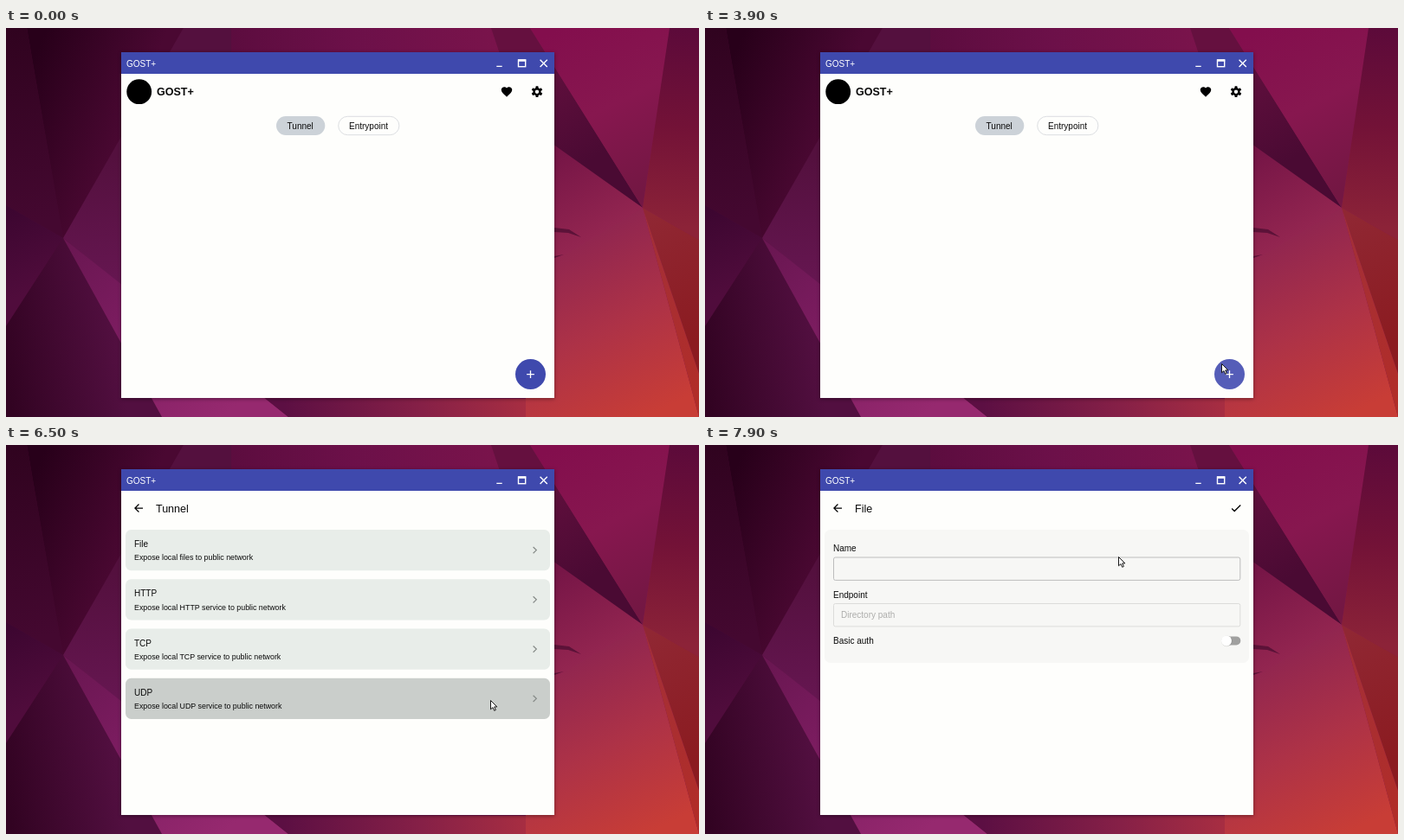
An HTML page with a canvas that plays this animation: 800x450 px, repeating every 8000 ms.

```html
<!DOCTYPE html>
<html lang="en">
<head>
<meta charset="utf-8">
<title>GOST+</title>
<style>
html, body { margin: 0; width: 100%; height: 100%; overflow: hidden; background: #4a0833; }
canvas, svg { position: absolute; left: 0; top: 0; width: 800px; height: 450px; }
text { font: 10px "Liberation Sans", Arial, sans-serif; fill: #0b0b0b; }
.head { font-size: 12.5px; }
.sub { font-size: 8.85px; }
.window { filter: drop-shadow(0 1px 2px rgba(0, 0, 0, .4)); }

.home, .list, .form, .cursor, .fab, .card { animation: 8s step-end infinite; }
.home { animation-name: home; }
.list { animation-name: list; }
.form { animation-name: form; }
.fab { fill: #3f49ad; animation-name: fab; }
.card { fill: #e8ede9; }
.file { animation-name: file; }
.http { animation-name: http; }
.tcp { animation-name: tcp; }
.udp { animation-name: udp; }
.cursor { animation-name: appear, move; }

@keyframes home { 0% { visibility: visible } 72.5%, 100% { visibility: hidden } }
@keyframes list { 0% { visibility: hidden } 72.5% { visibility: visible } 97.5%, 100% { visibility: hidden } }
@keyframes form { 0% { visibility: hidden } 97.5%, 100% { visibility: visible } }
@keyframes appear { 0% { visibility: hidden } 36.25%, 100% { visibility: visible } }
@keyframes fab { 0% { fill: #3f49ad } 46.25%, 100% { fill: #555db8 } }
@keyframes udp { 0% { fill: #e8ede9 } 81.25% { fill: #cacecb } 82.5%, 100% { fill: #e8ede9 } }
@keyframes tcp { 0% { fill: #e8ede9 } 82.5% { fill: #cacecb } 85%, 100% { fill: #e8ede9 } }
@keyframes http { 0% { fill: #e8ede9 } 85% { fill: #cacecb } 86.25%, 100% { fill: #e8ede9 } }
@keyframes file { 0% { fill: #e8ede9 } 87.5%, 100% { fill: #cacecb } }

/* the pointer advances in 100 ms steps */
@keyframes move {
  0%, 36.25% { transform: translate(451px, 405px); animation-timing-function: steps(8) }
  46.25% { transform: translate(596px, 388px) }
  58.75% { transform: translate(596px, 388px); animation-timing-function: steps(4) }
  63.75% { transform: translate(611px, 391px) }
  66.25% { transform: translate(614px, 392px) }
  76.25% { transform: translate(614px, 392px); animation-timing-function: steps(4) }
  81.25% { transform: translate(559px, 295px); animation-timing-function: steps(4) }
  86.25% { transform: translate(488px, 151px) }
  87.5% { transform: translate(479px, 138px); animation-timing-function: steps(3) }
  91.25%, 100% { transform: translate(477px, 129px) }
}
</style>
</head>
<body>
<canvas id="wall" width="800" height="450"></canvas>
<svg viewBox="0 0 800 450">
  <defs>
    <path id="back" d="M20 11H7.83l5.59-5.59L12 4l-8 8 8 8 1.41-1.41L7.83 13H20z"/>
    <rect id="tooth" x="-1.5" y="-6.4" width="3" height="4" rx=".5"/>
  </defs>

  <rect class="window" x="133" y="28" width="500" height="400" fill="#fefefc"/>
  <rect x="133" y="28" width="500" height="25" fill="#3f49ad"/>
  <text x="139" y="44.5" style="fill:#fff">GOST+</text>
  <g fill="none" stroke="#fff" stroke-width="1.4">
    <path d="M566.3 44.4h6.4M616.6 36.8l8.2 8.2m0-8.2l-8.2 8.2"/>
    <rect x="591.5" y="37" width="8.2" height="7.7"/>
    <path d="M591 37.5h9.2" stroke-width="2.5"/>
  </g>

  <g class="home">
    <circle cx="153.7" cy="73.7" r="14.4"/>
    <text class="head" x="174" y="78" font-weight="700" style="font-weight:700">GOST+</text>
    <path transform="translate(570.5 66.3) scale(.625)" d="M12 21.35l-1.45-1.32C5.4 15.36 2 12.28 2 8.5 2 5.42 4.42 3 7.5 3c1.74 0 3.41.81 4.5 2.09C13.09 3.81 14.76 3 16.5 3 19.58 3 22 5.42 22 8.5c0 3.78-3.4 6.86-8.55 11.54z"/>
    <g transform="translate(613 73.7)">
      <circle r="3.4" fill="none" stroke="#000" stroke-width="2.4"/>
      <use href="#tooth"/>
      <use href="#tooth" transform="rotate(60)"/>
      <use href="#tooth" transform="rotate(120)"/>
      <use href="#tooth" transform="rotate(180)"/>
      <use href="#tooth" transform="rotate(240)"/>
      <use href="#tooth" transform="rotate(300)"/>
    </g>
    <rect x="312" y="102" width="56.3" height="22" rx="11" fill="#ccd2d8"/>
    <rect x="383.7" y="102.3" width="70.2" height="21.4" rx="10.7" fill="none" stroke="#d8dbde" stroke-width=".9"/>
    <text x="324.6" y="116.8">Tunnel</text>
    <text x="396" y="116.8">Entrypoint</text>
    <circle class="fab" cx="605.5" cy="400.5" r="17.5"/>
    <path d="M601.1 400.6h8.8m-4.4-4.4v8.8" stroke="#fff" stroke-width="1.3"/>
  </g>

  <g class="list">
    <use href="#back" transform="translate(145.5 65.5) scale(.625)"/>
    <text class="head" x="173" y="77.5">Tunnel</text>
    <g id="cards"></g>
  </g>

  <g class="form">
    <use href="#back" transform="translate(145.5 65.5) scale(.625)"/>
    <text class="head" x="173" y="77.5">File</text>
    <path transform="translate(605.6 65.5) scale(.625)" d="M9 16.17L4.83 12l-1.42 1.41L9 19 21 7l-1.41-1.41z"/>
    <rect x="138" y="98" width="490" height="154" rx="6.5" fill="#f7f7f5"/>
    <text x="148" y="122.8">Name</text>
    <rect x="148.5" y="130" width="469.3" height="26.4" rx="2" fill="none" stroke="#bdbdbd"/>
    <text x="148" y="176.5">Endpoint</text>
    <rect x="148.5" y="183.5" width="469.3" height="26.4" rx="2" fill="none" stroke="#dcdcda"/>
    <text x="157" y="200.4" style="fill:#adadab">Directory path</text>
    <text x="148" y="230">Basic auth</text>
    <rect x="598" y="221.4" width="20.3" height="10" rx="5" fill="#a0a09f"/>
    <circle cx="602.3" cy="226.9" r="6.3" fill="#000" opacity=".13"/>
    <circle cx="602" cy="226.4" r="6" fill="#fff"/>
  </g>

  <path class="cursor" d="M.5.5v10.3l2.5-2.2 1.7 3.7 1.7-.8-1.7-3.6h3.2z" fill="#fff" stroke="#181818" stroke-width="1" stroke-linejoin="round"/>
</svg>
<script>
const cards = ["File", "HTTP", "TCP", "UDP"].map((name, i) => {
  const what = i ? name + " service" : "files";
  return `<g transform="translate(0 ${i * 57.25})">
    <rect class="card ${name.toLowerCase()}" x="138" y="98" width="490" height="47.2" rx="6.5"/>
    <text x="148" y="118">${name}</text>
    <text class="sub" x="148" y="133.4">Expose local ${what} to public network</text>
    <path d="M608.6 118l3.7 3.6-3.7 3.6" fill="none" stroke="#858a87" stroke-width="1.2"/>
  </g>`;
});
document.getElementById("cards").innerHTML = cards.join("");

const ctx = document.getElementById("wall").getContext("2d");

// polygon filled with a linear gradient along [x1, y1, x2, y2]
function facet(points, axis, ...colors) {
  const g = ctx.createLinearGradient(...axis);
  colors.forEach((c, i) => g.addColorStop(i / (colors.length - 1), c));
  ctx.fillStyle = g;
  ctx.beginPath();
  for (let i = 0; i < points.length; i += 2) ctx.lineTo(points[i], points[i + 1]);
  ctx.fill();
}

facet([0, 0, 800, 0, 800, 450, 0, 450], [100, 0, 700, 0], "#4a0833", "#6c1049", "#84164d");
facet([0, 0, 24, 0, 66, 243, 0, 205], [0, 0, 50, 220], "#30031f", "#440830");
facet([24, 0, 205, 0, 66, 243], [30, 40, 150, 90], "#28001a", "#4a0832");
facet([205, 0, 260, 0, 260, 400, 66, 243], [100, 150, 110, 290], "#54103e", "#651650");
facet([0, 205, 66, 243, 0, 345], [0, 210, 40, 300], "#3c0630", "#500c3c");
facet([66, 243, 0, 345, 0, 450, 180, 450], [0, 400, 130, 380], "#320322", "#520f40");
facet([66, 243, 326, 450, 180, 450], [66, 243, 250, 450], "#681650", "#7e1d62", "#96296f");
facet([326, 450, 300, 429, 640, 429, 640, 450], [320, 0, 640, 0], "#5c0f43", "#862047", "#b23240");

facet([735, 208, 600, 120, 560, 0, 605, 0], [610, 30, 680, 150], "#65103f", "#4a0a33");
facet([605, 0, 766, 0, 735, 208], [640, 0, 735, 190], "#830e4d", "#87174f", "#731743");
facet([766, 0, 800, 0, 800, 245, 735, 208], [780, 0, 770, 230], "#5c0a3a", "#731237", "#8c2338");
facet([735, 208, 600, 112, 600, 300], [630, 140, 690, 250], "#741446", "#962751");
facet([735, 208, 600, 290, 600, 450, 800, 450], [640, 250, 740, 450], "#8f2550", "#ad3247", "#c83d36");
facet([735, 208, 800, 245, 800, 400], [740, 220, 800, 360], "#902733", "#8b1b20");
facet([735, 208, 800, 400, 800, 450], [740, 230, 800, 430], "#a32f38", "#b12d28");

ctx.fillStyle = "#5c1238";
ctx.fill(new Path2D("M633 231l17 2 14 9-15-5-16-1zM633 264l11-2-11 4z"));
</script>
</body>
</html>
```
